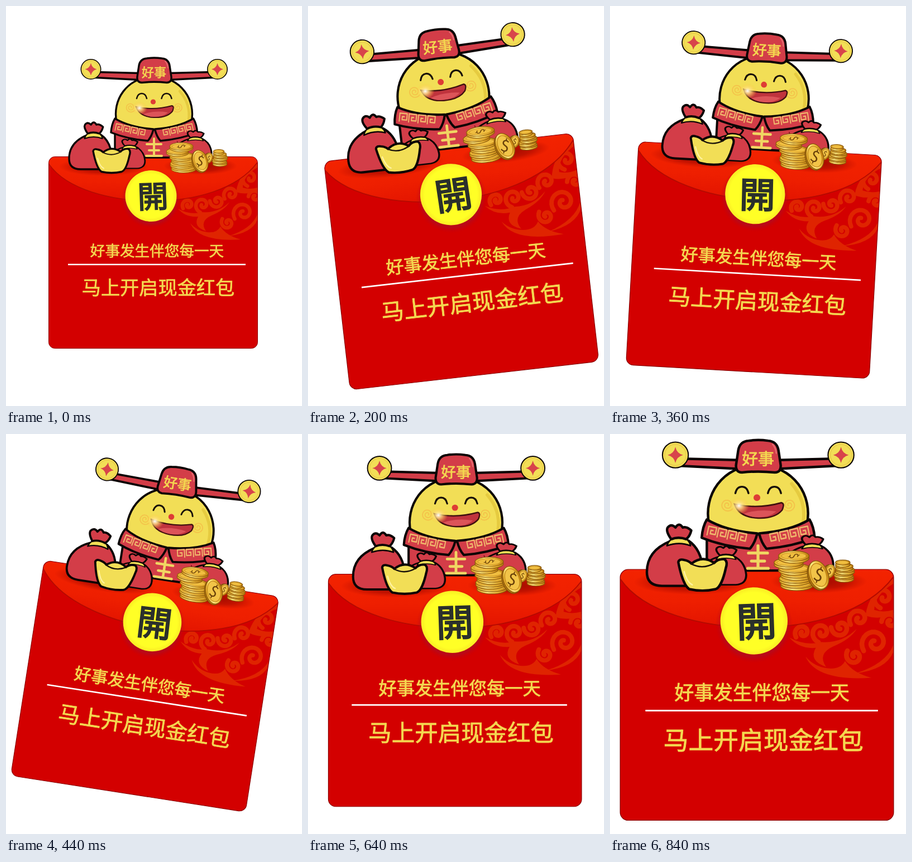
Animation of 530x718 px, one loop 1160 ms. Source, as an HTML page:

```html
<!DOCTYPE html>
<html lang="zh-CN">
<head>
<meta charset="utf-8">
<style>
html, body { margin: 0; width: 100%; height: 100%; overflow: hidden; background: #fff; }
svg { display: block; width: 100vw; height: 100vh; }
text { font-family: "Noto Sans CJK SC", "Noto Sans CJK", sans-serif; text-anchor: middle; fill: #f4d850; stroke: #f4d850; stroke-width: .7; }
.dark { fill: #2b302c; stroke: #2b302c; stroke-width: 2; }
.coin { fill: #694009; stroke: none; }
.ink { stroke: #0b0505; stroke-width: 3.4; stroke-linejoin: round; stroke-linecap: round; }
.red { fill: #d33d48; }
.gold { fill: #f2de56; }
.line { fill: none; stroke-linecap: round; stroke-linejoin: round; }
</style>
</head>
<body>
<svg viewBox="0 0 530 718">
  <defs>
    <linearGradient id="flap" x2="0" y2="1">
      <stop offset="0" stop-color="#f42400"/><stop offset=".6" stop-color="#ee1f00"/><stop offset="1" stop-color="#e31400"/>
    </linearGradient>
    <linearGradient id="coin">
      <stop offset="0" stop-color="#e0a01c"/><stop offset=".35" stop-color="#ffec85"/>
      <stop offset=".7" stop-color="#f0bb38"/><stop offset="1" stop-color="#b9780c"/>
    </linearGradient>
    <radialGradient id="shade">
      <stop offset="0" stop-color="#700" stop-opacity=".7"/><stop offset=".6" stop-color="#800" stop-opacity=".45"/>
      <stop offset="1" stop-color="#900" stop-opacity="0"/>
    </radialGradient>
    <radialGradient id="button">
      <stop offset=".85" stop-color="#ffff26"/><stop offset="1" stop-color="#f9ec24"/>
    </radialGradient>
    <radialGradient id="glow">
      <stop offset=".84" stop-color="#a01030" stop-opacity=".5"/><stop offset="1" stop-color="#c00010" stop-opacity="0"/>
    </radialGradient>
    <radialGradient id="spark">
      <stop offset="0" stop-color="#fff"/><stop offset=".35" stop-color="#ffe38a" stop-opacity=".8"/>
      <stop offset="1" stop-color="#ffc53a" stop-opacity="0"/>
    </radialGradient>
    <clipPath id="card"><rect x="77" y="271" width="373" height="343" rx="11"/></clipPath>
  </defs>
  <g id="scene"></g>
</svg>
<script>
const scene = document.getElementById('scene');

const ellipse = (x, y, rx, ry, attrs) => `<ellipse cx="${x}" cy="${y}" rx="${rx}" ry="${ry}" ${attrs}/>`;
const path = (d, attrs) => `<path d="${d}" ${attrs}/>`;
const stroke = (d, color, width) => path(d, `class="line" stroke="${color}" stroke-width="${width}"`);
const label = (s, x, y, size, attrs = '') => `<text x="${x}" y="${y}" font-size="${size}" ${attrs}>${s}</text>`;
const group = (transform, body) => `<g transform="${transform}">${body}</g>`;
const mirror = body => body + group('translate(530.5 0) scale(-1 1)', body);

// A curl winding inwards from radius r, starting at angle a (in turns)
function curl(x, y, r, a, turns, color, width) {
  let d = '';
  for (let i = 0; i <= 30; i++) {
    const u = i / 30, t = 2 * Math.PI * (a + u * turns), q = r * (1 - u * .85);
    d += `${i ? 'L' : 'M'}${(x + q * Math.cos(t)).toFixed(1)} ${(y + q * Math.sin(t)).toFixed(1)}`;
  }
  return stroke(d, color, width);
}

function envelope() {
  const tint = '#df2400';
  const curls = [[326, 357, 11, .4, 1.2], [352, 357, 14, .3, 1.2], [378, 350, 13, .5, -1.2],
    [403, 338, 14, .4, 1.2], [437, 309, 15, .3, 1.2], [425, 371, 19, .4, 1.3],
    [397, 389, 12, .6, -1.2], [446, 342, 12, .5, 1.2]]
    .map(c => curl(...c, tint, 6.5)).join('');
  const leaves = path('M308 364Q322 380 344 378Q334 396 358 404Q346 386 368 376Q392 366 400 352Q380 372 352 370Q330 376 308 364Z' +
    'M330 390Q345 424 420 419Q394 412 384 396Q378 408 360 406Q342 404 330 390Z' +
    'M398 413Q440 408 450 384V374Q440 400 398 413Z' +
    'M412 334Q416 300 450 283V290Q424 306 424 326Q436 330 450 326V332Q430 340 412 334Z', `fill="${tint}"`);
  const edge = 'M77 284C109 330 190 350 263 350S413 330 450 281';
  return '<rect x="76.5" y="270.5" width="374" height="344" rx="11" fill="#d30000" stroke="#8a0000"/>' +
    '<g clip-path="url(#card)">' + curls + leaves +
    path(edge + 'V260H77Z', 'fill="url(#flap)"') + stroke(edge, '#b40a00', 1.5) +
    ellipse(175, 288, 80, 17, 'fill="url(#shade)"') + ellipse(348, 287, 66, 16, 'fill="url(#shade)"') + '</g>' +
    ellipse(259.5, 346, 53, 53, 'fill="url(#glow)"') +
    ellipse(259.5, 341, 46, 46, 'fill="url(#button)"') +
    group('rotate(-2 263 341)', label('開', 263, 362, 55, 'class="dark"')) +
    label('好事发生伴您每一天', 270.5, 449, 26.6) +
    '<path d="M111 464H429" stroke="#fff" stroke-width="2.3"/>' +
    label('马上开启现金红包', 272.5, 517.5, 34.2);
}

function mascot() {
  const keys = [0, 1, 2, 3].map(i => stroke(`M${i * 14} 11V1H${i * 14 + 11}V9H${i * 14 + 4}V5H${i * 14 + 7}`, '#f0b66c', 1.7)).join('');
  const collar = path('M195 202Q222 218 264 221Q261 234 254 242Q218 239 188 227Q189 212 195 202Z', 'class="ink red"') +
    group('translate(198 210) rotate(12) scale(1 1.2)', keys);
  const sleeve = stroke('M224 243Q219 256 220 270', '#7f1721', 1.5);
  const eye = stroke('M234 166Q236 157 243 157T252 166', '#17100a', 2.6);
  const cheek = curl(223, 182, 9, .1, 2, '#f4c24a', 1.5);
  const bar = path('M160 118.5L238 120.5V132.5L160 128.5Z', 'class="ink red"');
  const knob = ellipse(152, 113.5, 17.7, 17.7, 'class="gold" stroke="#0b0505" stroke-width="1.6"') +
    ellipse(152, 113.5, 14.5, 14.5, 'fill="none" stroke="#e9c94a"') +
    path('M152 102.5Q154 111.5 162.5 113.5Q154 115.5 152 124.5Q150 115.5 141.5 113.5Q150 111.5 152 102.5Z', 'fill="#d8444b"');
  return path('M195 222V272H336V222Z', 'class="ink red"') + mirror(sleeve) +
    stroke('M265 238V269M252 248H278M256 259H274M251 269H279', '#f0d662', 4) +
    path('M198 208C190 170 215 128 265 127C315 128 340 170 332 208Q305 226 265 222Q225 226 198 208Z', 'class="ink gold"') +
    stroke('M311 153Q331 176 327 205', '#e6cb40', 4.5) +
    mirror(eye) + mirror(cheek) +
    path('M233 181Q265 188 297 179Q302 180 298 189Q288 201 265 200Q239 199 233 181Z', 'fill="#c0333d" stroke="#401010" stroke-width="2"') +
    path('M246 194Q266 187 290 191Q281 199 266 199Q254 199 246 194Z', 'fill="#dc5459"') +
    ellipse(239, 183, 14, 12, 'fill="url(#spark)"') +
    ellipse(263.5, 172, 4.6, 4.6, 'fill="#de3c35"') +
    mirror(collar) + mirror(bar) + mirror(knob) +
    path('M238 107Q240 95 252 94Q265 92 279 94Q291 95 293 107L296 127Q297 137 288 137.5Q265 135 243 137.5Q234 137 235 127Z', 'class="ink red"') +
    stroke('M285 99Q289 103 290 111', '#e46a70', 2) +
    label('好事', 265, 127, 22);
}

// Money bag in a box of 80 x 86, tied at the top
const bag = (x, y, sx, sy) => group(`translate(${x} ${y}) scale(${sx} ${sy})`,
  path('M33 24Q1 37 1 66Q1 85 22 85H62Q80 83 79 62Q77 35 59 23Z', 'class="ink red"') +
  path('M29 30Q33 18 46 18T62 30Q46 24 29 30Z', 'class="ink gold" style="stroke-width:2"') +
  path('M35 21Q27 10 30 5Q35 -1 41 5Q46 -3 51 5Q56 3 63 9Q61 17 56 21Q45 17 35 21Z', 'class="ink red"'));

function ingot() {
  return group('translate(1 1.5)',
    path('M155 259Q156 254 163 256Q169 257 173 261Q188 249 204 260Q210 254 218 255Q223 258 220 267C217 281 212 294 206 296Q188 300 170 296Q161 290 155 259Z', 'class="ink gold"') +
    stroke('M172 261Q188 270 205 260', '#171008', 2) +
    stroke('M163 272Q167 287 174 290', '#fff3a0', 2));
}

function coins() {
  const rim = 'fill="url(#coin)" stroke="#8a580c"';
  const flat = (x, y, rx, ry) => ellipse(x, y + 3, rx, ry, rim) + ellipse(x, y, rx, ry, rim) +
    ellipse(x, y, rx * .8, ry * .7, 'fill="#f0be40" stroke="#c08518" stroke-width=".7"');
  const dollar = (x, y, size, turn, sx = 1) => group(`translate(${x} ${y}) rotate(${turn}) scale(${sx} 1)`,
    label('$', 0, size * .35, size, 'class="coin"'));
  const upright = (x, y, rx, ry, turn) => group(`translate(${x} ${y}) rotate(${turn})`,
    ellipse(-2, 1, rx, ry, 'fill="#b87c12" stroke="#7a4c08"') + ellipse(0, 0, rx, ry, rim) +
    ellipse(0, 0, rx * .78, ry * .82, 'fill="#f2c448" stroke="#c08518"'));
  const tall = [[318, 290, 22, 6.5], [316, 283, 22, 6.5], [318, 276, 22, 6.5], [315, 269, 22, 6.5], [307, 261, 20, 6], [314, 252, 21, 7]];
  const low = [[383, 281, 13, 4], [382, 276, 13, 4], [384, 271, 13, 4], [383, 266, 12, 4], [381, 261, 10, 3.5]];
  return [...tall, ...low].map(c => flat(...c)).join('') +
    dollar(314, 252, 17, 80, .7) + upright(363, 273, 7, 9.5, 22) + dollar(363, 273, 11, 22) +
    upright(348, 278, 13, 20, -20) + dollar(348, 278, 24, 18);
}

scene.innerHTML = envelope() + mascot() + bag(300, 223, .86, .64) + bag(112, 208, .98, 1) +
  bag(184, 238, .82, .63) + ingot() + coins();

const sizes = [1, 1.215, 1.124, 1.309];
const powers = [2.05, 2.3, 1.93];

function pose(k) {
  const i = Math.min(2, Math.floor(k / 7));
  const u = Math.min(1, k / 7 - i);
  const scale = sizes[i] + (sizes[i + 1] - sizes[i]) * (1 - (1 - u) ** powers[i]);
  const swing = (k - 7) / 8.85;
  const angle = k < 7 ? -8.38 * Math.sin(Math.PI * k / 7)
    : swing < 1 ? 9.1 * Math.sin(Math.PI * swing) ** 2.4 : 0;
  return `translate(265 359) rotate(${angle}) scale(${scale}) translate(-265 -359)`;
}

const start = performance.now();
function draw() {
  const t = (performance.now() - start) % 1160;
  scene.setAttribute('transform', pose(Math.floor(t / 40)));
  requestAnimationFrame(draw);
}
draw();
</script>
</body>
</html>
```
